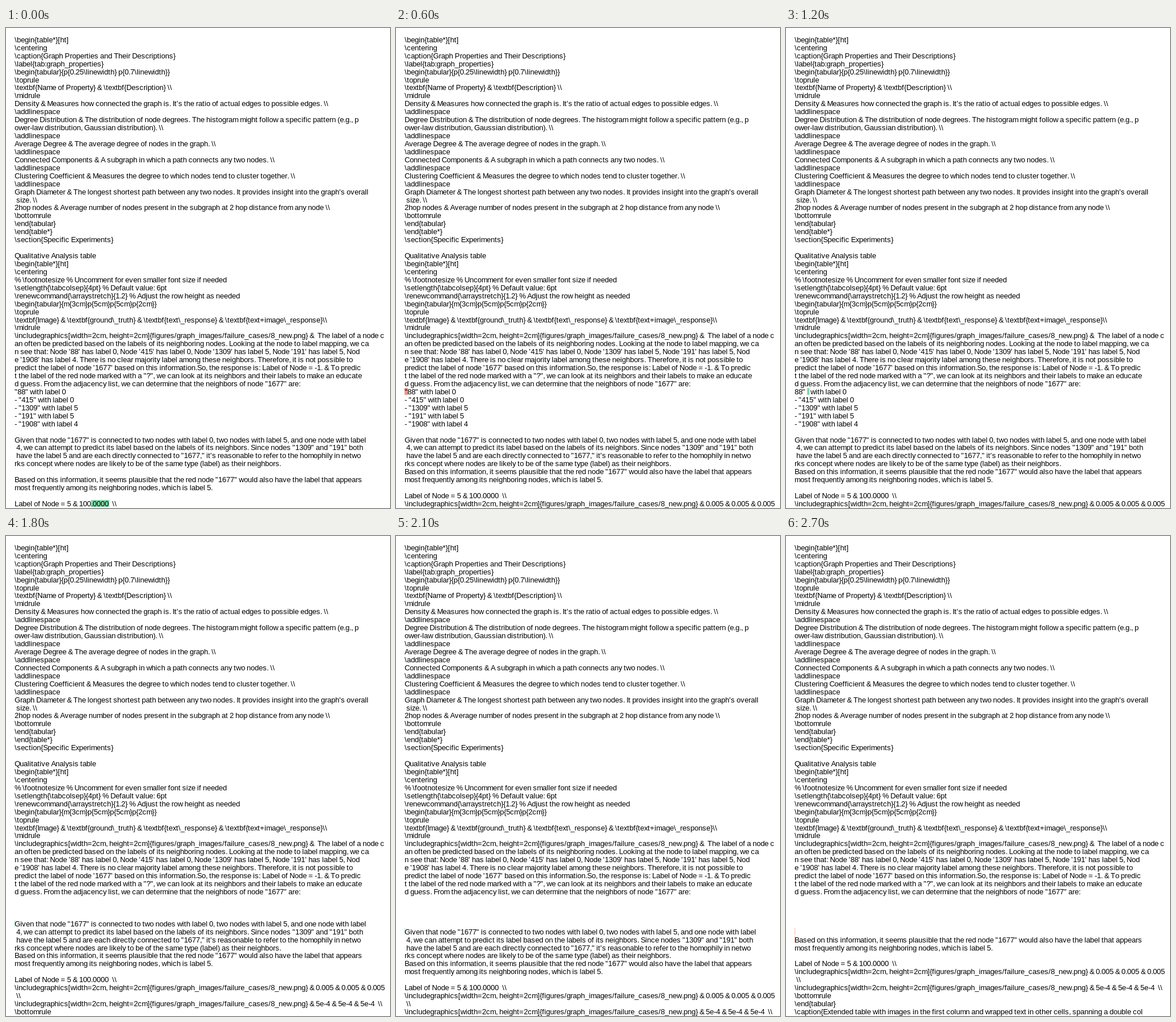
An HTML page that plays this animation: 670 by 836 pixels, repeating every 3 s.

```html
<!DOCTYPE html>
<html lang="en">
<head>
<meta charset="utf-8">
<title>LaTeX edit history</title>
<style>
  html, body { margin: 0; width: 100%; height: 100%; overflow: hidden; background: #fff; }
  svg { display: block; width: 670px; height: 836px; }
  text {
    font: 13px "Liberation Sans", Arial, sans-serif;
    font-variant-ligatures: none;
    white-space: pre;
    fill: #000;
  }
</style>
</head>
<body>
<svg id="page" viewBox="0 0 673 840" preserveAspectRatio="none"></svg>
<script>
const NS = "http://www.w3.org/2000/svg";
const LEFT = 15, TOP = 14, PITCH = 14, BAR = 12, ASCENT = 11;
const STEP = 300, LOOP = 3000;
const GREEN = "#80d9a7", RED = "#f1938a";

const head = String.raw`\begin{table*}[ht]
\centering
\caption{Graph Properties and Their Descriptions}
\label{tab:graph_properties}
\begin{tabular}{p{0.25\linewidth} p{0.7\linewidth}}
\toprule
\textbf{Name of Property} & \textbf{Description} \\
\midrule
Density & Measures how connected the graph is. It's the ratio of actual edges to possible edges. \\
\addlinespace
Degree Distribution & The distribution of node degrees. The histogram might follow a specific pattern (e.g., p
ower-law distribution, Gaussian distribution). \\
\addlinespace
Average Degree & The average degree of nodes in the graph. \\
\addlinespace
Connected Components & A subgraph in which a path connects any two nodes. \\
\addlinespace
Clustering Coefficient & Measures the degree to which nodes tend to cluster together. \\
\addlinespace
Graph Diameter & The longest shortest path between any two nodes. It provides insight into the graph's overall
 size. \\
2hop nodes & Average number of nodes present in the subgraph at 2 hop distance from any node \\
\bottomrule
\end{tabular}
\end{table*}
\section{Specific Experiments}

Qualitative Analysis table
\begin{table*}[ht]
\centering
% \footnotesize % Uncomment for even smaller font size if needed
\setlength{\tabcolsep}{4pt} % Default value: 6pt
\renewcommand{\arraystretch}{1.2} % Adjust the row height as needed
\begin{tabular}{m{3cm}p{5cm}p{5cm}p{2cm}}
\toprule
\textbf{Image} & \textbf{ground\_truth} & \textbf{text\_response} & \textbf{text+image\_response}\\
\midrule
\includegraphics[width=2cm, height=2cm]{figures/graph_images/failure_cases/8_new.png} &  The label of a node c
an often be predicted based on the labels of its neighboring nodes. Looking at the node to label mapping, we ca
n see that: Node '88' has label 0, Node '415' has label 0, Node '1309' has label 5, Node '191' has label 5, Nod
e '1908' has label 4. There is no clear majority label among these neighbors. Therefore, it is not possible to 
predict the label of node '1677' based on this information.So, the response is: Label of Node = -1. & To predic
t the label of the red node marked with a "?", we can look at its neighbors and their labels to make an educate
d guess. From the adjacency list, we can determine that the neighbors of node "1677" are:`.split("\n");

const list = ['- "415" with label 0', '- "1309" with label 5', '- "191" with label 5', '- "1908" with label 4'];

const given = `Given that node "1677" is connected to two nodes with label 0, two nodes with label 5, and one node with label
 4, we can attempt to predict its label based on the labels of its neighbors. Since nodes "1309" and "191" both
 have the label 5 and are each directly connected to "1677," it's reasonable to refer to the homophily in netwo
rks concept where nodes are likely to be of the same type (label) as their neighbors.`.split("\n");

const end = String.raw`Based on this information, it seems plausible that the red node "1677" would also have the label that appears
most frequently among its neighboring nodes, which is label 5.

Label of Node = 5 & 100.0000  \\
\includegraphics[width=2cm, height=2cm]{figures/graph_images/failure_cases/8_new.png} & 0.005 & 0.005 & 0.005
 \\
\includegraphics[width=2cm, height=2cm]{figures/graph_images/failure_cases/8_new.png} & 5e-4 & 5e-4 & 5e-4  \\
\bottomrule
\end{tabular}
\caption{Extended table with images in the first column and wrapped text in other cells, spanning a double col`.split("\n");

const blank = n => Array(n).fill("");
const withList = (first, gap = 0) => [first, ...list, "", ...given, ...blank(gap), ...end];
const noList = n => [...blank(n), ...given, ...end];
const rows = (from, n) => Array.from({ length: n }, (_, i) => [from + i, 0, Infinity]);

// Each step: lines after the head, marker colour, marked ranges [line, from, to]
const steps = [
  [withList('"88" with label 0', 1), GREEN, [[14, 23, 28]]],
  [withList('"88" with label 0', 1), RED, [[11, 0, 0]]],
  [withList('"88" with label 0'), RED, [[0, 0, 1]]],
  [withList('88"  with label 0'), GREEN, [[0, 3, 4]]],
  [withList('88"   with label 0'), GREEN, [[0, 4, 5]]],
  [withList('88"   with label 0'), RED, rows(0, 5)],
  [noList(3), GREEN, [[3, 0, 0]]],
  [noList(4), GREEN, [[4, 0, 0]]],
  [noList(4), RED, rows(4, 4)],
  [[...blank(5), ...end], RED, [[4, 0, 0], [5, 0, 0]]]
];

// Whole-pixel letter advances; anything unlisted is 7 wide
const advance = {};
const sizes = {
  3: " .,:;'ijlI", 4: "\\/[](){}-ftr", 5: "\"*", 6: "xyz",
  8: "&=+ABEST", 9: "CDHNOPQRUw", 10: "GmM", 11: "%W"
};
for (const w in sizes) for (const c of sizes[w]) advance[c] = +w;
const width = s => [...s].reduce((sum, c) => sum + (advance[c] || 7), 0);

function add(parent, tag, attrs = {}) {
  const el = document.createElementNS(NS, tag);
  for (const k in attrs) el.setAttribute(k, attrs[k]);
  return parent.appendChild(el);
}

function drawLine(parent, line, row) {
  if (!line) return;
  let x = LEFT;
  const xs = [...line].map(c => {
    const at = x;
    x += advance[c] || 7;
    return at;
  });
  add(parent, "text", { x: xs.join(" "), y: TOP + row * PITCH + ASCENT, "xml:space": "preserve" }).textContent = line;
}

function drawMark(parent, line, row, from, to, fill) {
  add(parent, "rect", {
    x: LEFT + width(line.slice(0, from)),
    y: TOP + row * PITCH,
    width: width(line.slice(from, to)) + 1,
    height: BAR,
    fill,
    opacity: from === to ? 0.7 : 1
  });
}

const page = document.getElementById("page");
head.forEach((line, i) => drawLine(page, line, i));

const groups = steps.map(([lines, colour, marks]) => {
  const g = add(page, "g", { visibility: "hidden" });
  for (const [i, from, to] of marks) drawMark(g, lines[i], head.length + i, from, to, colour);
  lines.forEach((line, i) => {
    if (head.length + i < 59) drawLine(g, line, head.length + i);
  });
  return g;
});

let shown = -1;
const start = performance.now();
function tick() {
  const now = Math.floor(((performance.now() - start) % LOOP) / STEP);
  if (now !== shown) {
    groups.forEach((g, i) => g.setAttribute("visibility", i === now ? "visible" : "hidden"));
    shown = now;
  }
  requestAnimationFrame(tick);
}
tick();
</script>
</body>
</html>
```
